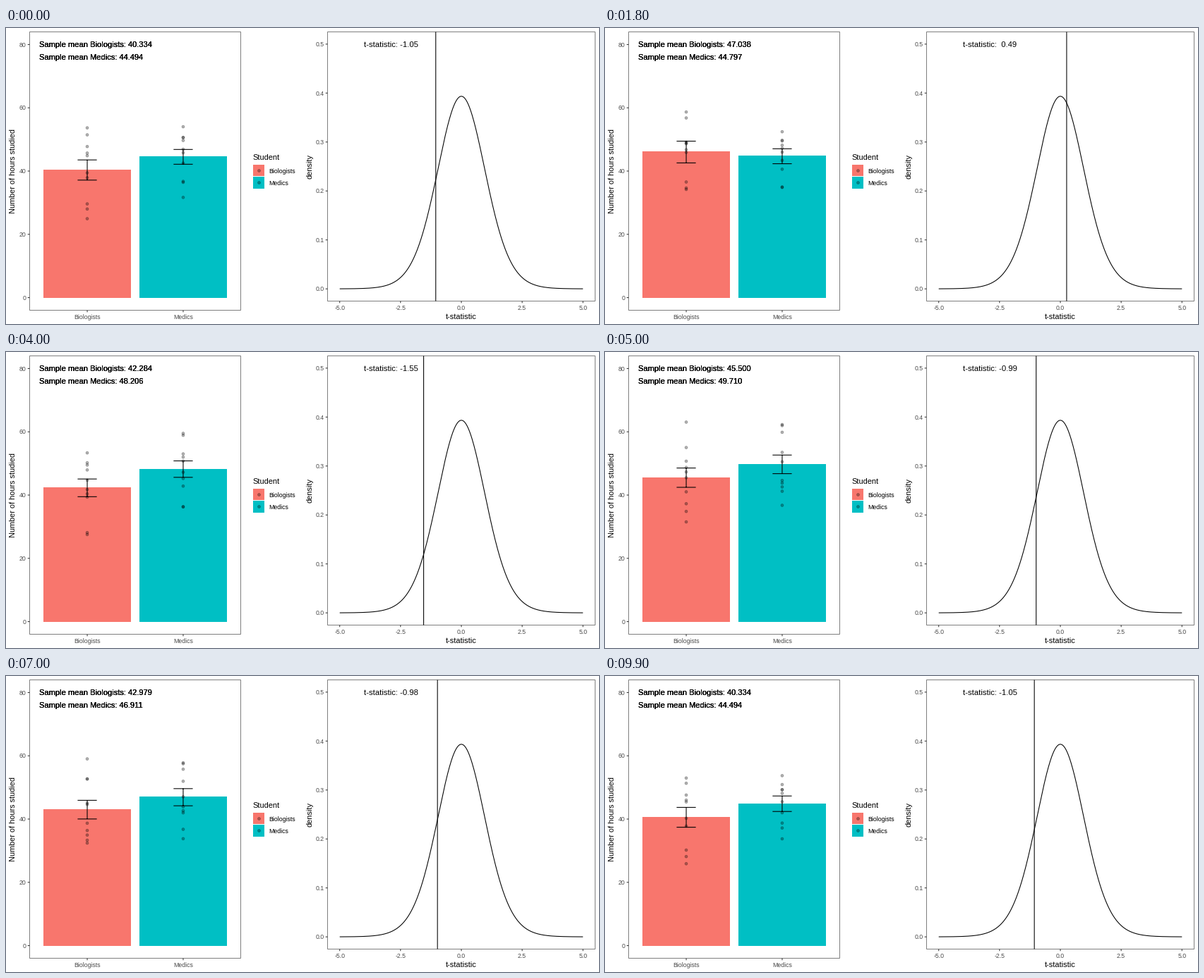
Animation, 840 px wide and 420 px high, one loop 10000 ms. Source, as a matplotlib script:

```python
import math

import matplotlib.pyplot as plt
import numpy as np
from matplotlib.animation import FuncAnimation
from matplotlib.patches import Rectangle

W, H, DPI = 840, 420, 100
PX = 72 / DPI  # points per pixel
N_FRAMES, PER_STATE = 100, 10
GROUPS, SIZE = ("Biologists", "Medics"), 10
RED, TEAL = "#F8766D", "#00BFC4"
BORDER, TICK, TICK_TEXT = "#7F7F7F", "#333333", "#4D4D4D"

plt.rcParams["font.family"] = "Liberation Sans"
plt.rcParams["path.snap"] = False

# Mean of both groups, then standard error of both, per drawn sample
STATES = np.array([
    (40.334, 44.494, 3.19, 2.34),
    (42.951, 44.348, 2.20, 2.24),
    (47.038, 44.797, 3.85, 2.40),
    (45.993, 46.985, 2.01, 2.48),
    (42.284, 48.206, 2.80, 2.60),
    (45.500, 49.710, 3.05, 2.94),
    (46.213, 51.214, 3.00, 2.60),
    (42.979, 46.911, 2.95, 2.71),
    (48.680, 47.557, 4.20, 3.80),
    (43.660, 49.800, 2.40, 4.00),
])
MEANS, ERRORS = STATES[:, :2], STATES[:, 2:]
T_VALUES = (MEANS[:, 0] - MEANS[:, 1]) / np.hypot(ERRORS[:, 0], ERRORS[:, 1])

rng = np.random.default_rng(4)


def sample(mean, se):
    """Random observations with exactly this mean and standard error."""
    z = rng.permutation(np.linspace(-1, 1, SIZE)) + rng.normal(0, 0.25, SIZE)
    z = (z - z.mean()) / z.std(ddof=1)
    return mean + se * math.sqrt(SIZE) * z


POINTS = np.array([np.concatenate([sample(m, e) for m, e in zip(*pair)])
                   for pair in zip(MEANS, ERRORS)])

# Panels as left, top, right, bottom in pixels
LEFT = (33.5, 5.5, 332.5, 400.5)
RIGHT = (455.5, 5.5, 834.5, 387.5)
UNIT = (LEFT[2] - LEFT[0]) / 2.2
CENTRES = (LEFT[0] + 0.6 * UNIT, LEFT[0] + 1.6 * UNIT)
DOT_X = np.repeat(CENTRES, SIZE)


def scale_y(panel, value, top):
    """Pixel height of a value on an axis from 0 to top with 5% margins."""
    height = panel[3] - panel[1]
    return panel[3] - height / 22 - value / top * height / 1.1


def hours_y(v):
    return scale_y(LEFT, v, 80)


def density_y(v):
    return scale_y(RIGHT, v, 0.5)


def t_x(t):
    return 645 + t * (RIGHT[2] - RIGHT[0]) / 11


fig = plt.figure(figsize=(W / DPI, H / DPI), dpi=DPI, facecolor="white")
ax = fig.add_axes([0, 0, 1, 1])
ax.set_xlim(0, W)
ax.set_ylim(H, 0)
ax.axis("off")


def text(x, y, s, size=11, color="black", ha="left", rotation=0):
    return ax.text(x, y, s, fontsize=size * PX, color=color, ha=ha,
                   va="baseline", rotation=rotation, rotation_mode="anchor")


def line(x, y, color="black", zorder=3):
    return ax.plot(x, y, color=color, lw=1.07 * PX, zorder=zorder,
                   solid_capstyle="butt")[0]


def block(x, y, w, h, color):
    """Filled box with hard pixel edges."""
    return ax.add_patch(Rectangle((x, y), w, h, fc=color, lw=0,
                                  antialiased=False, zorder=1))


def dots(x, y):
    return ax.scatter(x, y, s=[(3.9 * PX) ** 2] * len(x), c="black", alpha=0.3,
                      linewidths=0.71 * PX, zorder=2)


def tick_x(panel, x, label):
    line([x, x], [panel[3], panel[3] + 2.75], TICK)
    text(x, panel[3] + 12.6, label, 8.8, TICK_TEXT, "center")


def tick_y(panel, y, label):
    line([panel[0] - 2.75, panel[0]], [y, y], TICK)
    text(panel[0] - 5, y + 3.2, label, 8.8, TICK_TEXT, "right")


for x0, y0, x1, y1 in (LEFT, RIGHT):
    ax.add_patch(Rectangle((x0, y0), x1 - x0, y1 - y0, fill=False,
                           ec=BORDER, lw=PX, zorder=2.5))

for v in range(0, 81, 20):
    tick_y(LEFT, hours_y(v), str(v))
for v in np.arange(6) / 10:
    tick_y(RIGHT, density_y(v), f"{v:.1f}")
for t in np.linspace(-5, 5, 5):
    tick_x(RIGHT, t_x(t), f"{t:.1f}")

text(13, 203, "Number of hours studied", 10.9, ha="center", rotation=90)
text(433, 196.5, "density", ha="center", rotation=90)
text(645, 413, "t-statistic", ha="center")

# Legend and bars
text(349, 187, "Student")
bars = []
for i, (name, color) in enumerate(zip(GROUPS, (RED, TEAL))):
    y = 194 + 17.28 * i
    block(350, y, 16, 16, color)
    dots([358], [y + 8])
    text(371.8, y + 12, name, 8.8)
    tick_x(LEFT, CENTRES[i], name)
    bars.append(block(CENTRES[i] - 0.45 * UNIT, 0, 0.9 * UNIT, 0, color))

# Student t density
DF = 2 * SIZE - 2
t = np.linspace(-5, 5, 400)
peak = math.gamma((DF + 1) / 2) / (math.sqrt(DF * math.pi) * math.gamma(DF / 2))
line(t_x(t), density_y(peak * (1 + t * t / DF) ** (-(DF + 1) / 2)))

points = dots(DOT_X, np.zeros(2 * SIZE))
whiskers = [line([], []) for _ in GROUPS]
t_line = line([], [], zorder=4)
# Stacked copies give the mean labels their heavier look
mean_labels = [[text(47, y, "", 11.1) for _ in range(3)] for y in (27, 45)]
t_label = text(507, 27, "", 11.3)


def progress(frame):
    """State index and eased share of the way to the next one."""
    state, step = divmod(frame, PER_STATE)
    start = 3 if state == 0 else 4
    p = max(0, step - start) / (PER_STATE - start)
    return state, 0.5 - 0.5 * math.cos(math.pi * p)


def draw(frame):
    state, p = progress(frame)
    after = (state + 1) % len(STATES)
    shown = after if p > 0.5 + 1e-9 else state

    def tween(values):
        return (1 - p) * values[state] + p * values[after]

    for i, (mean, se) in enumerate(zip(tween(MEANS), tween(ERRORS))):
        bars[i].set_y(hours_y(mean))
        bars[i].set_height(hours_y(0) - hours_y(mean))
        c, cap, gap = CENTRES[i], 0.1 * UNIT, np.nan
        hi, lo = hours_y(mean + se), hours_y(mean - se)
        whiskers[i].set_data([c - cap, c + cap, gap, c, c, gap, c - cap, c + cap],
                             [hi, hi, gap, hi, lo, gap, lo, lo])
        for label in mean_labels[i]:
            label.set_text(f"Sample mean {GROUPS[i]}: {MEANS[shown, i]:.3f}")

    points.set_offsets(np.column_stack([DOT_X, hours_y(tween(POINTS))]))
    x = t_x(tween(T_VALUES))
    t_line.set_data([x, x], [RIGHT[1], RIGHT[3]])
    t_label.set_text(f"t-statistic: {T_VALUES[shown]:5.2f}")


anim = FuncAnimation(fig, draw, frames=N_FRAMES, interval=100,
                     init_func=lambda: draw(0), repeat=True, repeat_delay=0)
plt.show()
```
